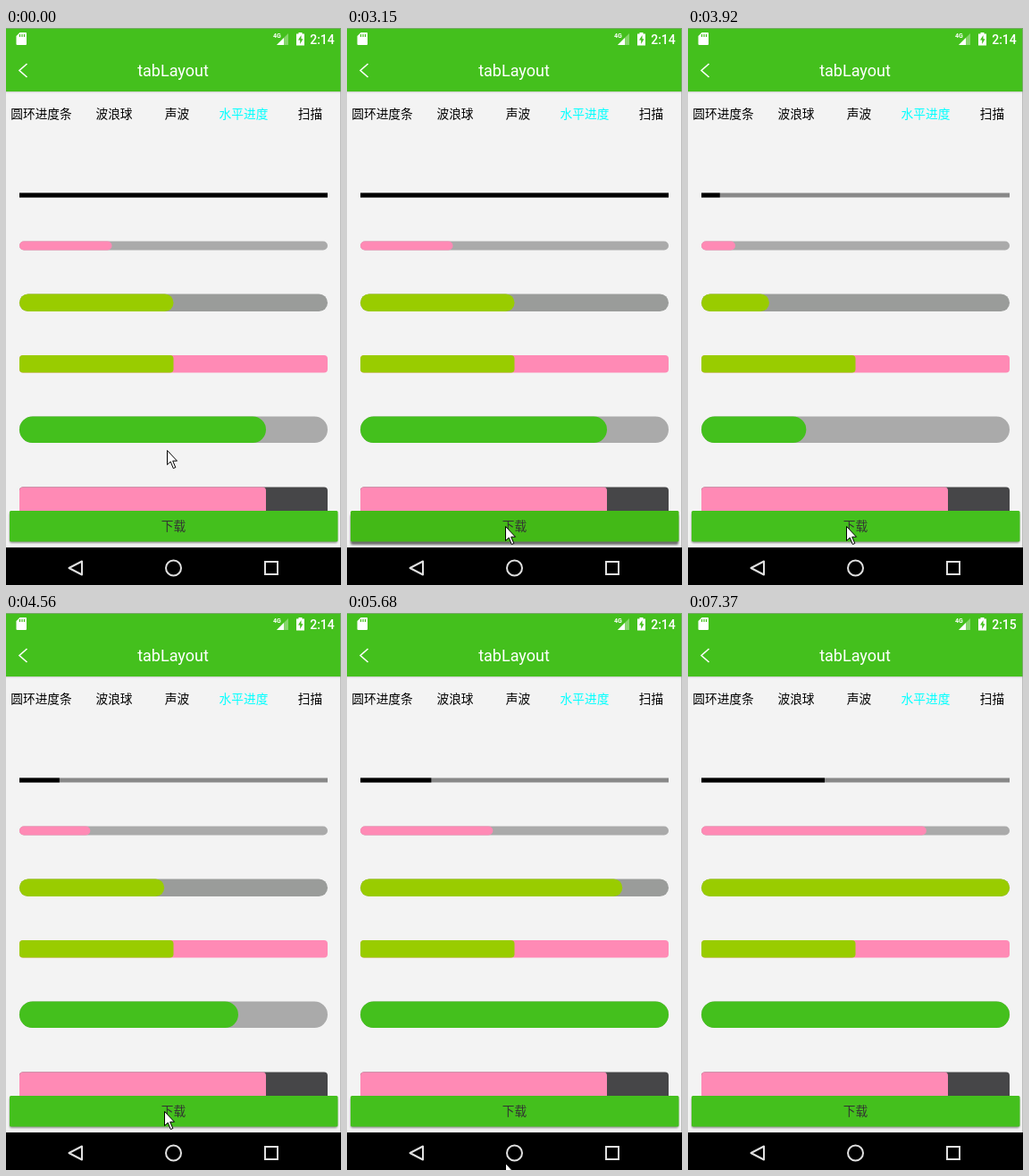
Recreate the animation shown at these times as an HTML page. Size 375 by 623 pixels, loop 7.42 s.

```html
<!DOCTYPE html>
<html lang="zh-CN">
<head>
<meta charset="utf-8">
<title>tabLayout</title>
<style>
  html, body { margin: 0; width: 100%; height: 100%; overflow: hidden; background: #f3f3f3; }
  svg { display: block; width: 100%; height: 100%; }
  text { font-family: Roboto, "Noto Sans CJK SC", "Noto Sans CJK", sans-serif; text-anchor: middle; }
  .cjk { font-family: "Noto Sans CJK SC", "Noto Sans CJK", sans-serif; font-size: 13.7px; }
</style>
</head>
<body>
<svg viewBox="0 0 375 623" xmlns="http://www.w3.org/2000/svg">
  <defs>
    <filter id="blur" x="-10%" y="-50%" width="120%" height="200%"><feGaussianBlur stdDeviation="1.3"/></filter>
    <linearGradient id="edge" x1="0" y1="0" x2="0" y2="1">
      <stop offset="0" stop-color="#000" stop-opacity=".16"/>
      <stop offset="1" stop-color="#000" stop-opacity="0"/>
    </linearGradient>
  </defs>
  <rect width="375" height="623" fill="#f3f3f3"/>
  <rect width="375" height="71" fill="#44c01d"/>
  <rect y="71" width="375" height="2" fill="url(#edge)"/>

  <g fill="#fff">
    <path d="M15.5 5H22q1 0 1 1V18q0 1-1 1H12.500q-1 0-1-1V9Z"/>
    <path d="M15.500 7v3M18 7v3M20.500 7v3" stroke="#44c01d" stroke-width="1.200"/>
    <text x="303.500" y="11" font-size="7" font-weight="700">4G</text>
    <path d="M316 6V19H303Z" opacity=".35"/>
    <path d="M311 11V19H303Z"/>
    <path d="M327.500 6.500V5h4v1.500H334V19.500H325V6.500Z"/>
    <path d="M330.500 8l-3.500 5.500h2.200V18l3.300-5.800h-2Z" fill="#44c01d"/>
    <text id="clock" x="354" y="17.700" font-size="14" font-weight="500">2:14</text>
    <text x="187" y="54" font-size="18">tabLayout</text>
  </g>
  <path d="M23.500 40L15 47.500L23.500 55" fill="none" stroke="#fff" stroke-width="1.600"/>

  <g class="cjk" fill="#000">
    <text x="39.500" y="101">圆环进度条</text>
    <text x="121" y="101">波浪球</text>
    <text x="191.500" y="101">声波</text>
    <text x="266" y="101" fill="#0ff">水平进度</text>
    <text x="340.500" y="101">扫描</text>
  </g>

  <g id="bars"></g>

  <rect id="shadow" x="4" y="542" width="367" height="34" rx="2" filter="url(#blur)"/>
  <rect id="button" x="4" y="540" width="367.500" height="34.500" rx="1.500"/>
  <text class="cjk" x="187.500" y="562" fill="#333">下载</text>

  <rect y="581" width="375" height="42" fill="#000"/>
  <g fill="none" stroke="#e0e0e0" stroke-width="2">
    <path d="M70.500 604L85 596.500V611.500Z" stroke-linejoin="round"/>
    <circle cx="187.500" cy="604" r="8.500"/>
    <rect x="290" y="597" width="14" height="14"/>
  </g>
  <path d="M0 .5H374.500V581" fill="none" stroke="#999" stroke-opacity=".6"/>
  <path id="cursor" d="M.5.5V16.500L4.200 13L7.300 20.500L9.800 19.500L6.700 12.200H11.500Z" fill="#fff" stroke="#000"/>
</svg>
<script>
const LOOP = 7420, LEFT = 15, WIDTH = 345;
const DOWNLOAD = 3330;
const $ = id => document.getElementById(id);

// Piecewise linear value from [time, value] pairs.
function track(points, t) {
  if (t <= points[0][0]) return points[0][1];
  for (let i = 1; i < points.length; i++) {
    const [t0, v0] = points[i - 1], [t1, v1] = points[i];
    if (t <= t1) return v0 + (v1 - v0) * (t - t0) / (t1 - t0);
  }
  return points[points.length - 1][1];
}

const ticks = [[3310, 0], [3920, 22], [4560, 47], [4790, 53.3], [5140, 66],
               [6320, 108], [7070, 136.3], [7370, 146]];
const cursorX = [[1130, 180], [1470, 177]];
const cursorY = [[1130, 472], [1300, 520], [1470, 557], [5400, 557], [5550, 580], [5720, 625]];

// rate and base turn download ticks into percent; bars without a rate stay put.
const bars = [
  { y: 184.5, h: 5, r: 0, back: '#888', fill: '#000', idle: 100, rate: .272, base: 0 },
  { y: 238.5, h: 10, r: 5, back: '#aaa', fill: '#ff8ab5', idle: 30, rate: .499, base: 0 },
  { y: 297.5, h: 19.5, r: 9.75, back: '#9a9c9a', fill: '#9c0', idle: 50, rate: 1, base: 0 },
  { y: 366, h: 19.5, r: 4, back: '#ff8ab5', fill: '#9c0', idle: 50 },
  { y: 434.5, h: 29.5, r: 14.75, back: '#aaa', fill: '#44c01d', idle: 80, rate: 1.452, base: 2.3 },
  { y: 513.5, h: 40, r: 4, back: '#464648', fill: '#ff8ab5', idle: 80 }
];

function addRect(bar, color) {
  const rect = document.createElementNS('http://www.w3.org/2000/svg', 'rect');
  const attrs = { x: LEFT, y: bar.y, width: WIDTH, height: bar.h, rx: bar.r, ry: bar.r, fill: color };
  for (const key in attrs) rect.setAttribute(key, attrs[key]);
  return $('bars').appendChild(rect);
}

for (const bar of bars) {
  addRect(bar, bar.back);
  bar.rect = addRect(bar, bar.fill);
}

function render(t) {
  const tick = track(ticks, t);
  for (const bar of bars) {
    const running = bar.rate && t >= DOWNLOAD;
    const percent = running ? Math.min(100, Math.round(tick * bar.rate + bar.base)) : bar.idle;
    const width = WIDTH * percent / 100;
    bar.rect.setAttribute('width', width);
    bar.rect.setAttribute('rx', Math.min(bar.r, width / 2));
  }

  const press = t < 3150 ? 0 : track([[DOWNLOAD, 1], [3600, 0]], t);
  $('button').setAttribute('fill', press > .5 ? '#43b917' : '#44c01d');
  $('shadow').setAttribute('y', 542 + 2 * press);
  $('shadow').setAttribute('fill-opacity', .4 + .15 * press);

  $('clock').textContent = t < 5900 ? '2:14' : '2:15';
  const x = Math.round(track(cursorX, t)), y = Math.round(track(cursorY, t));
  $('cursor').setAttribute('transform', `translate(${x} ${y})`);
}

const start = performance.now();
function frame() {
  render((performance.now() - start) % LOOP);
  requestAnimationFrame(frame);
}
render(0);
requestAnimationFrame(frame);
</script>
</body>
</html>
```
